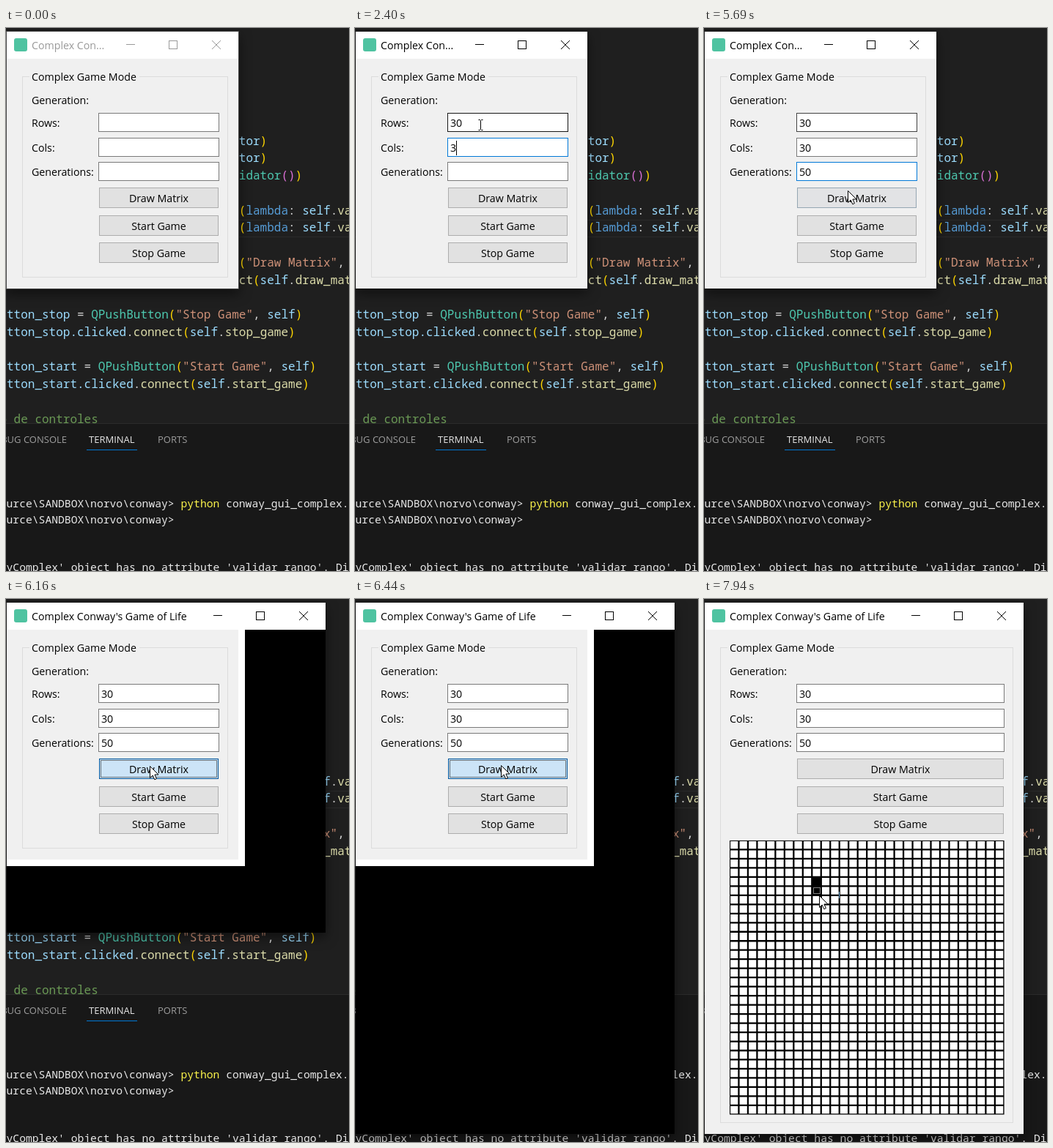
Animation of 468 by 742 pixels, one loop 8 s. Source, as an HTML page:

```html
<!DOCTYPE html>
<html lang="en">
<head>
<meta charset="utf-8">
<title>Complex Game Mode</title>
<style>
  html, body { margin: 0; width: 100%; height: 100%; overflow: hidden; background: #1f1f1f; }
  svg { display: block; }
  text { white-space: pre; }
  .ui { font: 14.2px "Open Sans", "Noto Sans", sans-serif; }
  .tab { font: 13px "Open Sans", "Noto Sans", sans-serif; }
  .code { font: 16px "Noto Sans Mono", "DejaVu Sans Mono", monospace; }
  .term { font: 14.7px "Noto Sans Mono", "DejaVu Sans Mono", monospace; }
  #win { filter: drop-shadow(0 6px 8px rgba(0, 0, 0, .5)); }
</style>
</head>
<body>
<svg width="468" height="742" viewBox="0 0 468 742">
  <g id="editor"></g>
  <g id="win"></g>
  <g id="grid"></g>
  <g id="pointer"></g>
</svg>
<script>
const $ = id => document.getElementById(id);
const LOOP = 8000;
const STEP = 66.7;

// ---------- drawing helpers ----------
const rect = (x, y, x2, y2, fill) =>
  `<rect x="${x}" y="${y}" width="${x2 - x}" height="${y2 - y}" fill="${fill}"/>`;
const frame = (x, y, x2, y2, fill, stroke, extra = '') =>
  `<rect x="${x + .5}" y="${y + .5}" width="${x2 - x - 1}" height="${y2 - y - 1}" style="fill:${fill};stroke:${stroke}" ${extra}/>`;
const label = (x, y, s, cls = 'ui', fill = '#000', anchor = 'start') =>
  `<text class="${cls}" x="${x}" y="${y}" fill="${fill}" text-anchor="${anchor}">${s}</text>`;
const mix = (a, b, k) => `color-mix(in srgb, ${a}, ${b} ${Math.round(k * 100)}%)`;

// ---------- editor and terminal ----------
const INK = {
  v: '#9cdcfe', t: '#4ec9b0', f: '#dcdcaa', s: '#ce9178', b: '#ffd700', n: '#da70d6',
  k: '#569cd6', p: '#d4d4d4', c: '#6a9955', w: '#e8e8e8', y: '#f9f14a'
};
// Tokens are written as "ink|text", joined by "~".
const tokens = src => src.split('~').map(part =>
  `<tspan fill="${INK[part[0]]}">${part.slice(2)}</tspan>`).join('');
const codeLine = (row, col, src) =>
  label(-8.6 + col * 9.6, 159.5 + row * 23.75, tokens(src), 'code');
const termLine = (y, src) => label(.5, y, tokens(src), 'term');

const button = (name, text) =>
  `v|utton_${name}~p| = ~t|QPushButton~b|(~s|"${text}"~p|, ~v|self~b|)`;
const connect = name =>
  `v|utton_${name}.clicked~p|.~f|connect~b|(~v|self~p|.~f|${name}_game~b|)`;
const path = 'w|urce\\SANDBOX\\norvo\\conway&gt; ';
const lambda = 'f|t~b|(~k|lambda~p|: ~v|self~p|.~f|validar';

$('editor').innerHTML =
  rect(0, 0, 468, 540, '#1f1f1f') +
  rect(0, 262, 468, 263, '#2a2a2a') + rect(0, 285, 468, 286, '#2a2a2a') +
  codeLine(0, 34, 'v|tor~b|)') +
  codeLine(1, 34, 'v|tor~b|)') +
  codeLine(2, 34, 't|idator~n|()~b|)') +
  codeLine(4, 33, lambda) +
  codeLine(5, 33, lambda) +
  codeLine(7, 33, 't|n~b|(~s|"Draw Matrix"~p|, ') +
  codeLine(8, 33, 'f|ect~b|(~v|self~p|.~f|draw_matrix') +
  codeLine(10, 0, button('stop', 'Stop Game')) +
  codeLine(11, 0, connect('stop')) +
  codeLine(13, 0, button('start', 'Start Game')) +
  codeLine(14, 0, connect('start')) +
  codeLine(16, 0, 'c|o de controles') +
  rect(0, 540, 468, 742, '#181818') + rect(0, 540, 468, 541, '#2b2b2b') +
  label(83, 567, 'DEBUG CONSOLE', 'tab', '#9d9d9d', 'end') +
  label(113, 567, 'TERMINAL', 'tab', '#e7e7e7') +
  label(207, 567, 'PORTS', 'tab', '#9d9d9d') +
  rect(110, 576, 179, 577, '#0078d4') +
  termLine(655, path + '~y|python~w| conway_gui_complex.py') +
  termLine(677, path) +
  termLine(742, "w|yComplex' object has no attribute 'validar_rango'. Did");

// ---------- pointer ----------
const PATH = [
  [260, 331, 476], [734, 166, 128], [934, 168, 131], [1067, 171, 132],
  [5336, 171, 132], [5469, 176, 138], [5603, 194, 218], [5669, 196, 222],
  [5740, 196, 228], [6300, 196, 228], [6420, 199, 227],
  [6660, 199, 227], [7130, 184, 394], [7460, 155, 389], [7600, 155, 389],
  [7800, 157, 403], [7930, 157, 405]
];
const snap = t => Math.floor((t + 8) / STEP) * STEP;

function pointerAt(t) {
  if (t < PATH[0][0]) return [-99, -99];
  const i = PATH.findIndex(k => k[0] > t);
  if (i < 0) return PATH[PATH.length - 1].slice(1);
  const [t0, x0, y0] = PATH[i - 1], [t1, x1, y1] = PATH[i];
  const u = (t - t0) / (t1 - t0), e = u * u * (3 - 2 * u);
  return [x0 + (x1 - x0) * e, y0 + (y1 - y0) * e];
}

const inside = ([x, y], a, b, c, d) => x >= a && x < c && y >= b && y < d;

// Averaging the recent pointer positions gives the fade in and out.
function hover(t, ...box) {
  let n = 0;
  for (let i = 0; i < 7; i++) n += inside(pointerAt(snap(t) - i * STEP), ...box);
  return n / 7;
}

function drawPointer(t, right, bottom) {
  const p = pointerAt(snap(t)), [x, y] = p.map(Math.round);
  const inWindow = inside(p, 1, 5, right, bottom);
  const inField = FIELDS.some(f => inside(p, 126, f.y, 291, f.y + 26));
  if (inWindow && !inField) {
    return `<path transform="translate(${x} ${y})" d="M.5.5V16.5L4.2 13L6.8 18.8L9.4 17.6L6.9 12H12Z" fill="#fff" stroke="#000"/>`;
  }
  return `<path transform="translate(${x}.5 ${y}.5)" d="M-3-7H-1L0-6L1-7H3M0-6V6M-3 7H-1L0 6L1 7H3" fill="none" stroke="${inWindow ? '#000' : '#fff'}"/>`;
}

// ---------- window ----------
const FIELDS = [
  { name: 'Rows:', y: 116, text: '30', keys: [1740, 2000] },
  { name: 'Cols:', y: 150, text: '30', keys: [2400, 2660] },
  { name: 'Generations:', y: 183, text: '50', keys: [4010, 4740] }
];
const BUTTONS = [['Draw Matrix', 218], ['Start Game', 256], ['Stop Game', 293]];
const CARET_OFF = [[1470, 1740], [3600, 4010], [4670, 4740], [5340, 5870]];
const ACTIVE = 870, PRESS = 5940, READY = 6510;

const focusedField = t =>
  t < ACTIVE ? -1 : t < 2200 ? 0 : t < 2920 ? 1 : t < PRESS ? 2 : -1;

const windowSize = t =>
  t < 6090 ? [317, 356] : t < 6160 ? [326, 365] : t < 6230 ? [436, 456] : [436, 731];

function titleBar(t, right) {
  const ink = t < ACTIVE ? '#999' : '#000';
  const title = t < 6160 ? 'Complex Con...' : "Complex Conway's Game of Life";
  const close = right - 30, max = right - 89, min = right - 147;
  return rect(1, 5, right, 42, '#fff') +
    '<rect x="11" y="14" width="18" height="18" rx="3" fill="#4fc3a1"/>' +
    label(35, 28.5, title, 'ui', ink) +
    rect(min - 6, 22, min + 6, 23, ink) +
    frame(max - 6, 17, max + 6, 29, 'none', ink) +
    `<path d="M${close - 6} 17l12 12m0-12l-12 12" stroke="${ink}" fill="none"/>`;
}

function field(f, i, t, right) {
  const typed = f.text.slice(0, f.keys.filter(k => t >= k).length);
  const focused = focusedField(t) === i;
  const border = focused ? '#0078d7'
    : mix('#7a7a7a', '#171717', hover(t, 126, f.y, right, f.y + 26));
  const caret = focused && !CARET_OFF.some(([a, b]) => t >= a && t < b);
  const x = 130 + Math.round(typed.length * 8.2);
  return label(35, f.y + 19, f.name) +
    frame(126, f.y, right, f.y + 26, '#fff', border) +
    label(130, f.y + 19, typed) +
    (caret ? rect(x, f.y + 4, x + 1, f.y + 24, '#000') : '');
}

function pushButton([name, y], i, t, right) {
  const k = hover(t, 127, y, right, y + 28);
  const pressed = i === 0 && t >= PRESS && t < READY;
  const focused = i === 0 && t >= PRESS && t < 7470;
  const fill = pressed ? '#cce4f7' : mix('#e1e1e1', '#e5f1fb', k);
  const edge = pressed ? '#005499' : mix('#adadad', '#0078d7', k);
  return frame(127, y, right, y + 28, fill, edge) +
    (focused ? frame(129, y + 2, right - 2, y + 26, 'none', '#000', 'stroke-dasharray="1 1"') : '') +
    label((127 + right) / 2, y + 20, name, 'ui', '#000', 'middle');
}

function drawWindow(t) {
  const [right, bottom] = windowSize(t);
  const ready = t >= READY;
  const edge = ready ? 422 : 303;
  const outline = t < ACTIVE ? frame(0, 4, right + 1, bottom + 1, 'none', '#464646') : '';
  const body = ready
    ? rect(1, 42, right, bottom, '#f0f0f0')
    : rect(1, 42, right, bottom, '#000') +
      (t >= 6090 ? rect(1, 42, 326, 365, '#fff') : '') +
      rect(1, 42, 317, 356, '#f0f0f0');
  return outline + body + titleBar(t, right) +
    frame(22, 66, edge, ready ? 716 : 341, 'none', '#dcdcdc') +
    rect(32, 60, 182, 74, '#f0f0f0') +
    label(35, 72, 'Complex Game Mode') +
    label(35, 104, 'Generation:') +
    FIELDS.map((f, i) => field(f, i, t, edge - 12)).join('') +
    BUTTONS.map((b, i) => pushButton(b, i, t, edge - 13)).join('');
}

// ---------- matrix ----------
const CELL = 12.48;
const cellX = col => 35 + col * CELL, cellY = row => 330 + row * CELL;
let holes = '';
for (let n = 0; n < 900; n++) {
  holes += `M${cellX(n % 30) + 1.1} ${cellY(Math.floor(n / 30)) + 1.1}h10.2v10.2h-10.2z`;
}
const liveCell = row => rect(cellX(9), cellY(row), cellX(10) + .8, cellY(row + 1) + .5, '#000');
const focusCell = (row, ink) =>
  frame(149, Math.round(cellY(row)) + 2, 159, Math.round(cellY(row)) + 11, 'none', ink, 'stroke-dasharray="1 1"');

$('grid').innerHTML = rect(35, 330, 409.6, 704.5, '#000') +
  `<path d="${holes}" fill="#fff"/><g id="cells"></g>`;

function drawCells(t) {
  const second = t >= 7870;
  return (t >= 7130 ? rect(184, 400, 185, 409, '#6fa8d0') : '') +
    (t >= 7540 ? liveCell(4) : '') + (second ? liveCell(5) : '') +
    (t >= 7470 ? focusCell(second ? 5 : 4, t >= 7540 ? '#fff' : '#000') : '');
}

// ---------- loop ----------
function render(t) {
  $('win').innerHTML = drawWindow(t);
  $('grid').style.display = t >= READY ? '' : 'none';
  $('cells').innerHTML = drawCells(t);
  $('pointer').innerHTML = drawPointer(t, ...windowSize(t));
}

let start;
function tick(now) {
  start ??= now;
  render((now - start) % LOOP);
  requestAnimationFrame(tick);
}
render(0);
requestAnimationFrame(tick);
</script>
</body>
</html>
```
